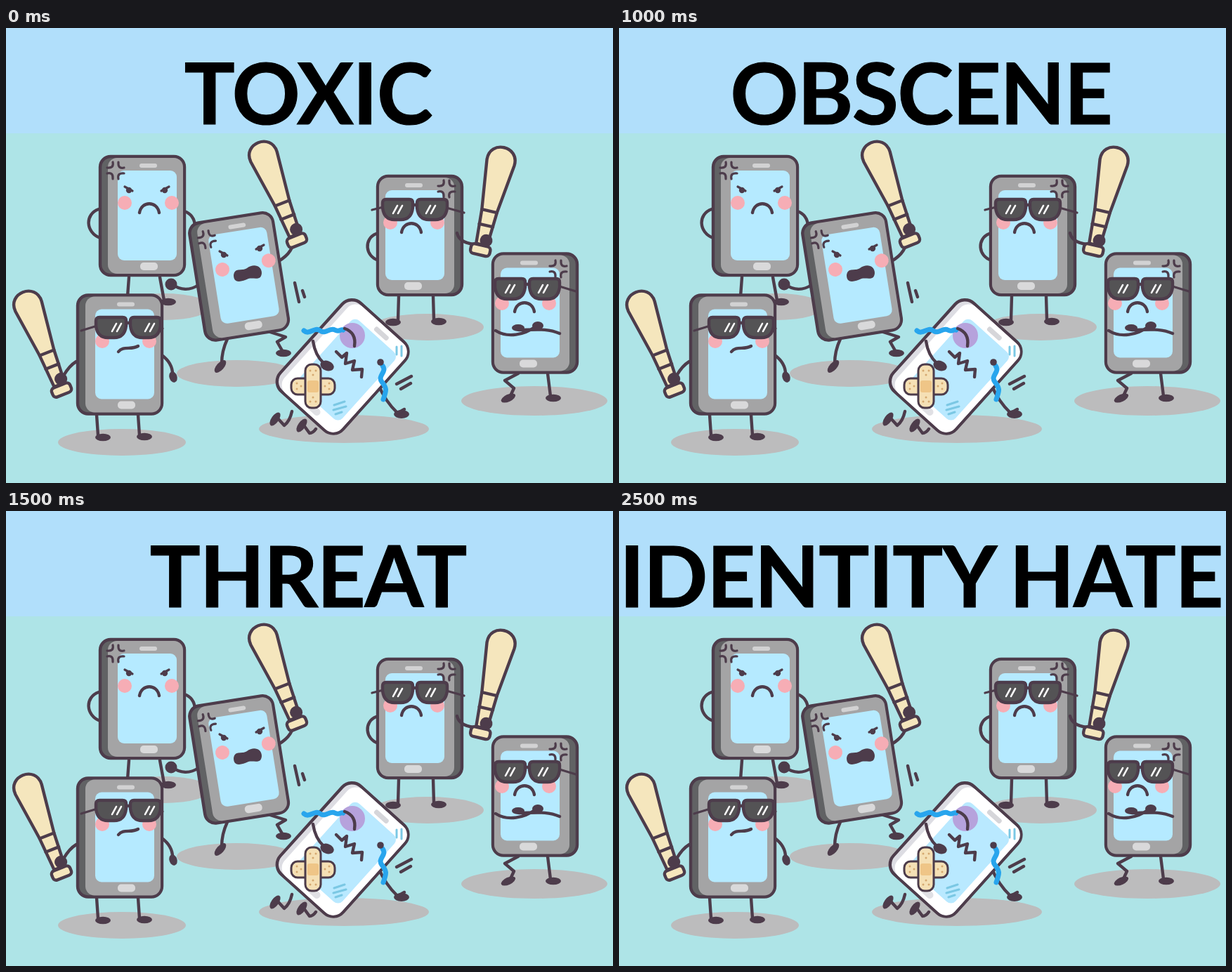
An HTML page for the animation above (3 s loop, 864x648 px).

```html
<!DOCTYPE html>
<html lang="en">
<head>
<meta charset="utf-8">
<title>Comment categories</title>
<style>
  html, body { margin: 0; width: 100%; height: 100%; overflow: hidden; background: #aee4e7; }
  svg { display: block; width: 864px; height: 648px; }
  #title { font: 700 120px Lato, sans-serif; letter-spacing: -1.2px; word-spacing: -4px; text-anchor: middle; fill: #000; stroke: #000; stroke-width: 1.2; }
  .ink { fill: none; stroke: #4d3c4b; stroke-width: 4.4; stroke-linecap: round; stroke-linejoin: round; }
  .solid { fill: #4d3c4b; stroke: none; }
  .shadow { fill: #bcbcbd; }
  .cheek { fill: #f6adb5; stroke: none; }
  .tear { stroke: #28a5ed; stroke-width: 7; }
  .thin { stroke-width: 3.2; }
</style>
</head>
<body>
<svg viewBox="0 0 864 648">
  <defs>
    <g id="phone">
      <rect class="ink" x="1" y="1" width="120" height="169" rx="15" style="fill:#616264"/>
      <rect x="12" y="3" width="107" height="165" rx="13" fill="#a4a4a5"/>
      <rect x="26" y="21" width="84" height="128" rx="9" fill="#b5eaff"/>
      <rect x="57" y="11" width="25" height="6" rx="3" fill="#d2d2d3"/>
      <rect x="58" y="152" width="25" height="11" rx="5" fill="#d9d9da"/>
    </g>
    <g id="bat" class="ink">
      <path d="M-20 22C-22 -7 22 -7 20 22L11 93 8 142H-8L-11 93Z" fill="#f5e6bd"/>
      <path d="M-11 93H11M-10 114H10"/>
      <rect x="-14" y="143" width="28" height="14" rx="5" fill="#f5e6bd"/>
      <circle class="solid" cx="5" cy="135" r="9"/>
    </g>
    <path id="lens" d="M0 5Q0 0 5 0H38Q43 0 43 5V12Q41 29 26 29H17Q2 29 0 12Z"/>
    <g id="glasses" class="ink">
      <path d="M40 8H53"/>
      <g fill="#545355"><use href="#lens"/><use href="#lens" x="49"/></g>
    </g>
    <path id="glints" d="M15 20L21 9M22 20L28 9M62 20L68 9M69 20L75 9" fill="none" stroke="#fff" stroke-width="2.6" stroke-linecap="round"/>
    <path id="hook" d="M-4 -12Q-2 -3 -12 -4"/>
    <g id="anger" class="ink thin">
      <use href="#hook"/><use href="#hook" transform="rotate(90)"/>
      <use href="#hook" transform="rotate(180)"/><use href="#hook" transform="rotate(270)"/>
    </g>
    <g id="cheeks" class="cheek"><circle r="10"/><circle cx="67" r="10"/></g>
    <path id="frown" class="ink" d="M-14 6C-11 -11 11 -11 14 6"/>
    <g id="eye"><path class="ink thin" d="M-6 -4L5 2"/><circle class="solid" cy="1" r="4.2"/></g>
    <ellipse id="foot" class="solid" rx="11" ry="5.2"/>
  </defs>

  <rect width="864" height="648" fill="#aee4e7"/>
  <rect width="864" height="150" fill="#b1dffb"/>
  <text id="title" x="430" y="137">TOXIC</text>

  <g class="shadow">
    <ellipse cx="225" cy="397" rx="66" ry="19"/>
    <ellipse cx="328" cy="492" rx="85" ry="19"/>
    <ellipse cx="165" cy="590" rx="91" ry="19"/>
    <ellipse cx="600" cy="426" rx="80" ry="19"/>
    <ellipse cx="752" cy="531" rx="104" ry="21"/>
    <ellipse cx="481" cy="571" rx="121" ry="20"/>
  </g>

  <!-- back left -->
  <path class="ink" d="M132 258C112 265 113 291 134 299M254 261Q268 266 269 282M175 355L173 382M219 355L225 388"/>
  <use href="#foot" x="231" y="390"/>
  <use href="#phone" x="133" y="182"/>
  <use href="#anger" x="156" y="203"/>
  <use href="#cheeks" x="169" y="249"/>
  <use href="#eye" x="175" y="230"/>
  <use href="#eye" transform="translate(226 230) scale(-1 1)"/>
  <use href="#frown" x="204" y="257"/>

  <!-- shouting -->
  <path class="ink" d="M274 366C262 374 248 374 235 364M388 332C402 324 410 314 413 290M315 443Q307 460 307 478M376 433L398 440 386 447 394 461M411 363L417 390M422 374L425 383"/>
  <circle class="solid" cx="235" cy="365" r="8.5"/>
  <use href="#foot" transform="translate(305 482) rotate(-48)"/>
  <use href="#foot" x="395" y="463"/>
  <use href="#phone" transform="translate(258 279) rotate(-9)"/>
  <use href="#anger" transform="translate(286 301) rotate(-9)"/>
  <use href="#cheeks" transform="translate(308 344) rotate(-11)"/>
  <use href="#eye" x="310" y="322"/>
  <use href="#eye" transform="translate(361 313) scale(-1 1)"/>
  <path class="solid" d="M324 352C326 340 336 347 343 342C352 335 364 338 364 349C363 361 353 355 345 357C336 361 324 365 324 352"/>
  <use href="#bat" transform="translate(359 163) rotate(-21.5)"/>

  <!-- front left -->
  <path class="ink" d="M100 475Q90 481 82 495M222 466Q238 478 237 495M129 551L131 580M188 551L190 580"/>
  <ellipse class="solid" cx="238" cy="497" rx="5.5" ry="8" transform="rotate(-18 238 497)"/>
  <use href="#foot" x="138" y="583"/><use href="#foot" x="197" y="582"/>
  <use href="#phone" x="101" y="379.500"/>
  <use href="#cheeks" x="137" y="446"/>
  <path class="ink thin" d="M107 431L130 424M220 424L223 428"/>
  <use href="#glasses" x="128" y="412"/>
  <use href="#glints" x="136" y="412"/>
  <path class="ink" d="M160 461C167 452 178 459 188 453"/>
  <use href="#bat" transform="translate(24 376) rotate(-21.5)"/>

  <!-- back right -->
  <path class="ink" d="M527 293C509 300 511 325 530 331M559 382L558 416M608 382L609 415"/>
  <use href="#foot" x="551" y="419"/><use href="#foot" x="616" y="418"/>
  <use href="#phone" transform="translate(650 210) scale(-1 1)"/>
  <use href="#anger" x="627" y="229"/>
  <use href="#cheeks" x="547" y="277"/>
  <path class="ink thin" d="M521 259L537 255M627 256L652 263"/>
  <use href="#glasses" x="536" y="244"/>
  <use href="#glints" x="536" y="244"/>
  <use href="#frown" x="577" y="285"/>
  <path class="ink" d="M642 292Q646 309 676 308"/>
  <use href="#bat" transform="translate(709 170) rotate(13)"/>

  <!-- front right -->
  <path class="ink" d="M729 492L710 502 723 513 717 526M771 492L775 524"/>
  <use href="#foot" transform="translate(715 527) rotate(-25)"/><use href="#foot" x="779" y="527"/>
  <use href="#phone" transform="translate(814 320.500) scale(-1 1)"/>
  <use href="#anger" x="786" y="343"/>
  <use href="#cheeks" x="706" y="392"/>
  <path class="ink thin" d="M788 368L811 375"/>
  <use href="#glasses" x="696" y="357"/>
  <use href="#glints" x="696" y="357"/>
  <use href="#frown" x="738" y="398"/>
  <path class="ink" d="M697 431C714 442 738 437 754 425M788 435C770 427 752 430 730 430"/>
  <g class="solid">
    <ellipse cx="729" cy="427" rx="9" ry="5"/><ellipse cx="757" cy="424" rx="8" ry="6"/>
  </g>

  <!-- victim -->
  <path class="ink" d="M407 546Q404 560 396 566L386 555M441 571Q437 577 432 577L424 566M530 508Q540 532 557 548M556 507L577 496M562 514L576 506"/>
  <use href="#foot" transform="translate(383 557) rotate(-55)"/>
  <use href="#foot" transform="translate(421 566) rotate(-55)"/>
  <ellipse class="solid" cx="563" cy="550" rx="11" ry="6"/>
  <path class="ink" d="M558 548L567 543"/>
  <g transform="translate(491 378) rotate(42)">
    <rect class="ink" x="1" y="1" width="120" height="169" rx="19" style="fill:#dddde3"/>
    <rect x="10" y="3" width="109" height="165" rx="16" fill="#fff"/>
    <rect x="26" y="21" width="84" height="128" rx="9" fill="#b9e9ff"/>
    <rect x="58" y="10" width="25" height="7" rx="3" fill="#d6d6da"/>
    <rect x="57" y="153" width="25" height="10" rx="5" fill="#e0e0e4"/>
  </g>
  <path class="ink" d="M467 537L482 532M466 544L484 539M469 550L478 547M556 454V465M563 453V467" style="stroke:#7bc8e4;stroke-width:3"/>
  <circle cx="493" cy="438" r="18" fill="#b6a2dc"/>
  <path class="ink tear" d="M424 431C432 438 439 425 447 431S461 426 468 430 476 428 480 430M536 481C543 490 528 495 535 504S542 515 537 529"/>
  <path class="ink" d="M482 428Q499 434 496 453M470 461L478 469 485 463 483 478 496 474 493 487 507 486 506 497M437 446Q440 466 452 477"/>
  <circle class="solid" cx="533" cy="476" r="4.8"/>
  <ellipse class="solid" cx="457" cy="481" rx="10" ry="7" transform="rotate(20 457 481)"/>
  <g class="ink" style="stroke-width:3">
    <rect x="406" y="499" width="62" height="23" rx="9" fill="#f5e0b5"/>
    <rect x="426" y="479" width="22" height="62" rx="9" fill="#f5e0b5"/>
  </g>
  <rect x="429" y="502" width="16" height="17" rx="3" fill="#efc587"/>
  <path class="ink" d="M433 488h0M441 488h0M437 494h0M433 532h0M441 532h0M437 526h0M414 506h0M414 514h0M420 510h0M460 506h0M460 514h0M454 510h0" style="stroke:#d5a870;stroke-width:3"/>
</svg>
<script>
  const words = ['TOXIC', 'SEVERE TOXIC', 'OBSCENE', 'THREAT', 'INSULT', 'IDENTITY HATE'];
  const title = document.getElementById('title');
  const start = performance.now();

  function draw(now) {
    const elapsed = Math.max(0, now - start);
    const word = words[Math.floor(elapsed / 500) % words.length];
    if (title.textContent !== word) title.textContent = word;
    requestAnimationFrame(draw);
  }
  requestAnimationFrame(draw);
</script>
</body>
</html>
```
